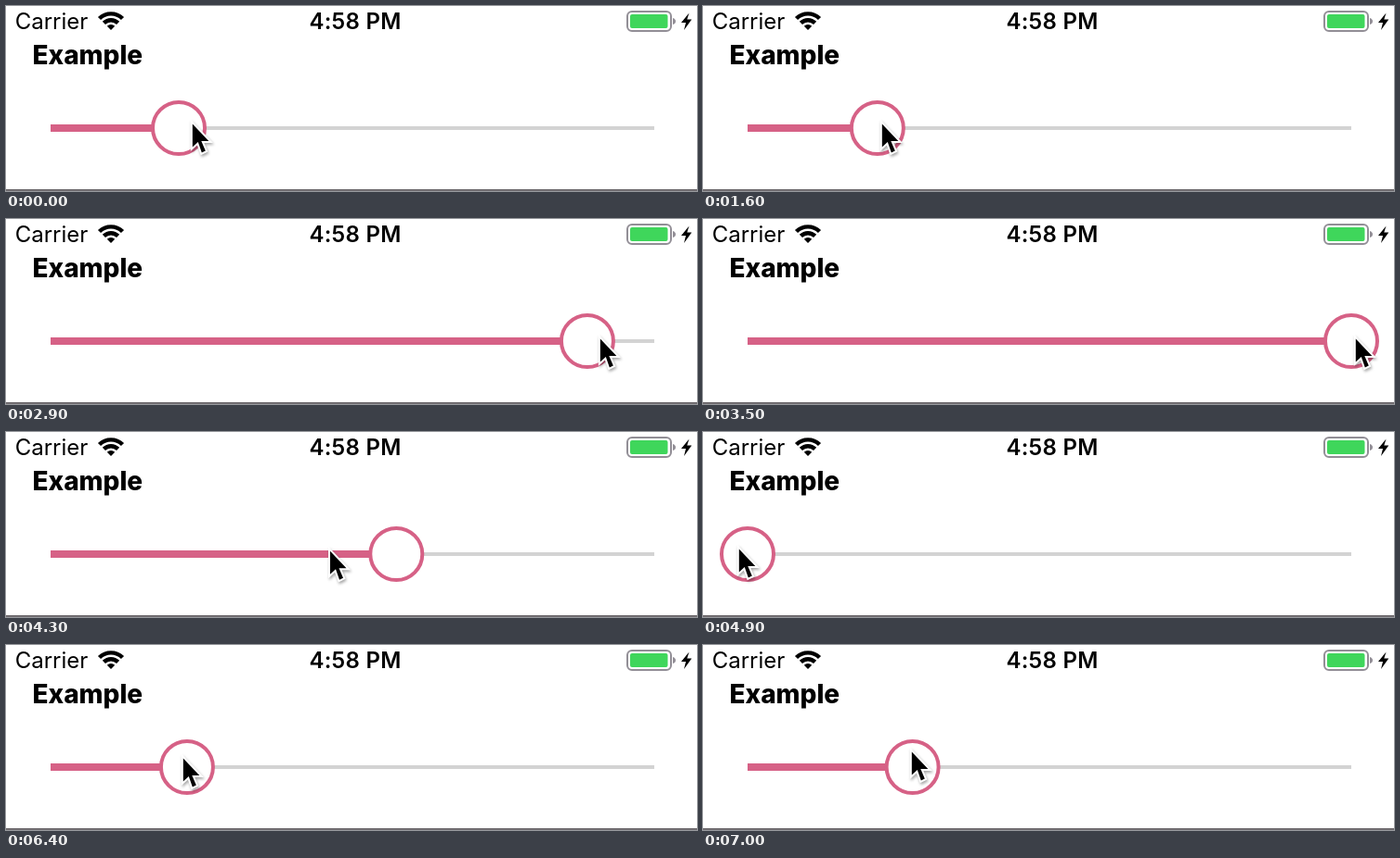
An HTML page for the animation above (8.2 s loop, 744x200 px).

```html
<!DOCTYPE html>
<html lang="en">
<head>
<meta charset="utf-8">
<title>Slider</title>
<style>
  html, body { margin: 0; width: 100%; height: 100%; overflow: hidden; background: #fff; }
  svg { display: block; width: 744px; height: 200px; font-family: Inter, sans-serif; }
  #cursor { paint-order: stroke; filter: drop-shadow(1px 2px 1.5px rgba(0, 0, 0, .35)); }
</style>
</head>
<body>
<svg viewBox="0 0 744 200">
  <text x="9.7" y="25" font-size="24">Carrier</text>
  <text x="376" y="25" font-size="24" font-weight="600" letter-spacing=".25" text-anchor="middle">4:58 PM</text>
  <text x="28.5" y="63" font-size="28" font-weight="800">Example</text>

  <g fill="none" stroke="#000" stroke-width="4.4">
    <path d="M100.5 13.5A17.7 17.7 0 0 1 125.5 13.5"/>
    <path d="M105.4 18.4A10.7 10.7 0 0 1 120.6 18.4"/>
    <path d="M113 26L108.8 21.8A6 6 0 0 1 117.2 21.8Z" fill="#000" stroke="none"/>
  </g>

  <rect x="669" y="6" width="47" height="21" rx="5" fill="none" stroke="#928e96" stroke-width="2"/>
  <rect x="672" y="9" width="40.5" height="15" rx="2" fill="#3fd65b"/>
  <path d="M718 13Q721 14 721 16.5T718 20Z" fill="#928e96"/>
  <path d="M735.5 7.5L727 18H732L730 26L738.3 14.5H733.3Z"/>

  <rect x="48" y="130" width="650" height="4" fill="#d3d3d3"/>
  <rect id="fill" x="48" y="128" height="8" fill="#d66186"/>
  <circle id="thumb" cy="132" r="28" fill="#fff" stroke="#d66186" stroke-width="4"/>
  <rect y="198" width="744" height="2" fill="#706d70"/>
  <path id="cursor" d="M.8 1.5v25l6-5.5 4 11.5 4-2-4.5-10.5h8z" stroke="#fff" stroke-width="4"/>
</svg>
<script>
const LOOP = 8200, STEP = 100;
const LEFT = 48, RIGHT = 698;
const GRAB = 14.5;  // step at which the pointer takes hold of the thumb
const LAG = 0.7;    // steps by which the thumb trails the pointer

// Turning points and rests of the pointer: [step, x, y]
const path = [
  [0, 200, 126], [2, 200, 126], [6, 190.5, 126], [10, 186, 126], [GRAB, 186, 126],
  [16, 192, 126], [24, 528, 128], [33, 692, 128], [35, 702, 128], [38, 702, 128],
  [47, 58, 126], [49, 38, 125], [50, 38, 125], [57, 446, 130], [58, 398, 128],
  [64, 190, 121], [67, 312, 117], [69.5, 224, 114], [82, 224, 114]
];

const slope = (i, c) => (path[i + 1][c] - path[i][c]) / (path[i + 1][0] - path[i][0]);

function tangent(i, c) {
  if (i === 0 || i === path.length - 1) return 0;
  const a = slope(i - 1, c), b = slope(i, c);
  return a * b > 0 ? 2 * a * b / (a + b) : 0;
}

// Monotone cubic through column c of the path
function pointer(step, c) {
  const i = path.findIndex(p => p[0] > step) - 1;
  const from = path[i], to = path[i + 1];
  const span = to[0] - from[0], u = (step - from[0]) / span, v = 1 - u;
  return v * v * ((1 + 2 * u) * from[c] + u * span * tangent(i, c))
       + u * u * ((1 + 2 * v) * to[c] - v * span * tangent(i + 1, c));
}

const [fill, thumb, cursor] = ["fill", "thumb", "cursor"].map(id => document.getElementById(id));

function draw(ms) {
  const step = Math.floor(ms % LOOP / STEP);
  const held = pointer(Math.max(GRAB, step - LAG), 1);
  const x = Math.min(RIGHT, Math.max(LEFT, held));
  fill.setAttribute("width", x - LEFT);
  thumb.setAttribute("cx", x);
  cursor.setAttribute("transform", `translate(${pointer(step, 1)} ${pointer(step, 2)})`);
}

const start = performance.now();
function tick() {
  draw(performance.now() - start);
  requestAnimationFrame(tick);
}
tick();
</script>
</body>
</html>
```
